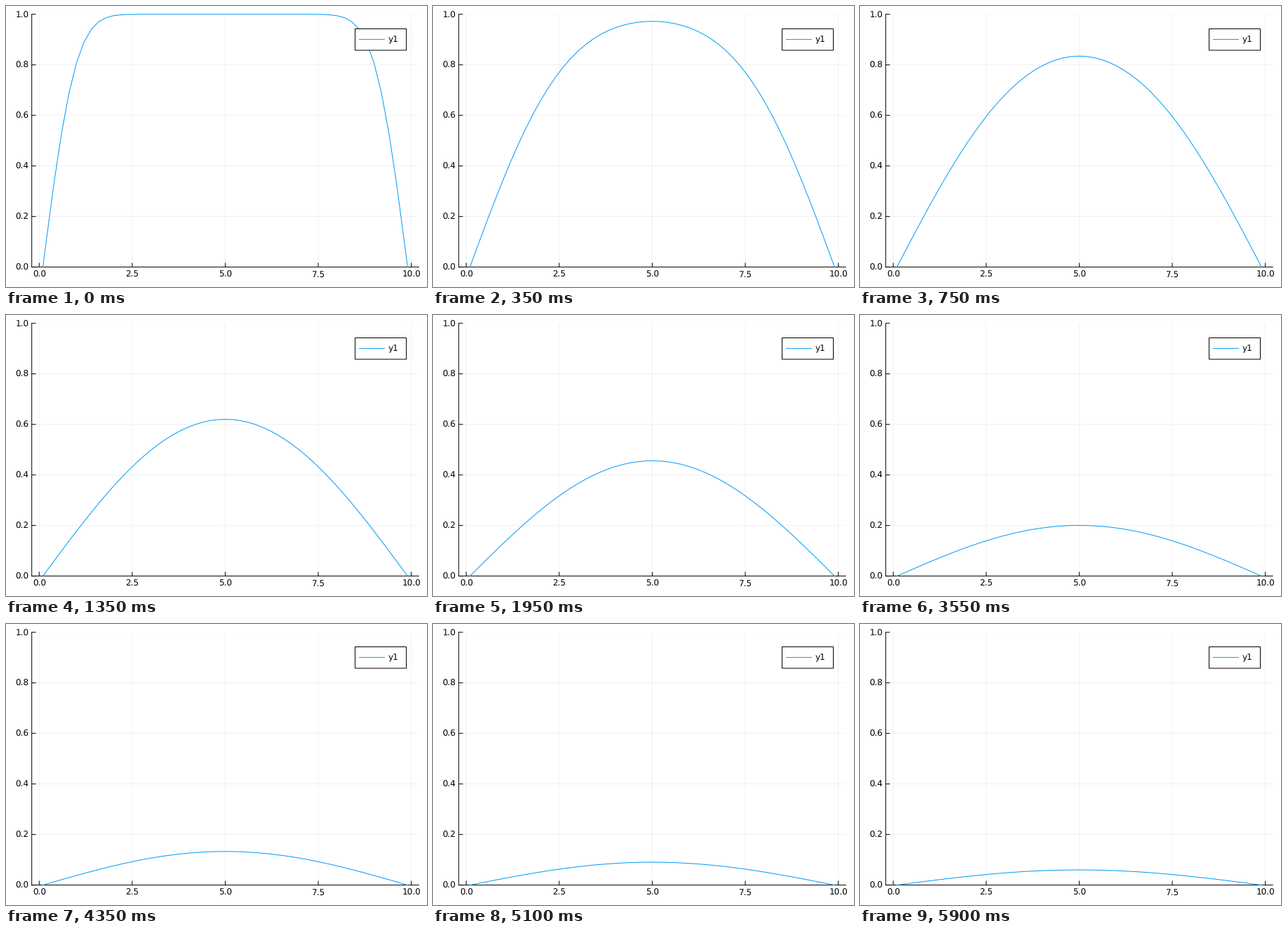
Write a matplotlib script that moves like this. It is 600x400 px and loops after 5.95 s.

```python
import numpy as np
import matplotlib.pyplot as plt
from matplotlib.animation import FuncAnimation
from matplotlib.lines import Line2D
from matplotlib.patches import Rectangle
from matplotlib.transforms import Affine2D

W, H, DPI = 600, 400, 100
PX = 72 / DPI  # points per pixel
LEFT, RIGHT, TOP, BOTTOM = 36.7, 588.2, 11.8, 371.6
BLUE = "#009AF9"
FONT = 12 * PX
TICK = 6

FRAMES, INTERVAL = 119, 50
DX, DT, STEPS = 0.2, 0.01, 25

plt.rcParams.update({
    "font.family": "DejaVu Sans",
    "path.snap": False,
    "text.hinting": "no_hinting",
})


def diffuse(u, steps):
    """Explicit heat steps with zero walls midway to mirrored ghost cells."""
    for _ in range(steps):
        g = np.concatenate(([-u[0]], u, [-u[-1]]))
        u = u + DT / DX**2 * (g[2:] - 2 * u + g[:-2])
    return u


cells = np.arange(1, 50) * DX
x = np.concatenate(([0.1], cells, [9.9]))
profiles = [diffuse(np.ones(len(cells)), STEPS - 1)]
while len(profiles) < FRAMES:
    profiles.append(diffuse(profiles[-1], STEPS))

fig = plt.figure(figsize=(W / DPI, H / DPI), dpi=DPI, facecolor="white")
ax = fig.add_axes([LEFT / W, 1 - BOTTOM / H, (RIGHT - LEFT) / W, (BOTTOM - TOP) / H])
x0, x1 = -0.2, 10.2
xticks, yticks = np.linspace(0, 10, 5), np.linspace(0, 1, 6)
ax.set(xlim=(x0, x1), ylim=(0, 1), xticks=xticks, yticks=yticks)
ax.xaxis.set_major_formatter("{x:.1f}")
ax.yaxis.set_major_formatter("{x:.1f}")
ax.tick_params(length=0, labelsize=FONT)
ax.tick_params(axis="x", pad=4.8 * PX)
ax.tick_params(axis="y", pad=4 * PX)
ax.grid(color="black", alpha=0.06, linewidth=PX)
ax.set_axisbelow(True)
ax.spines[["top", "right"]].set_visible(False)
ax.spines[["left", "bottom"]].set_linewidth(PX)

# Inward ticks as plain lines, so they keep subpixel positions
tick_style = dict(color="black", lw=PX, clip_on=False)
ax.vlines(xticks, 0, TICK / (BOTTOM - TOP), **tick_style)
ax.hlines(yticks, x0, x0 + TICK * (x1 - x0) / (RIGHT - LEFT), **tick_style)

curve, = ax.plot([], [], color=BLUE, lw=PX, clip_on=False, zorder=3)
ax.set(xlim=(x0, x1), ylim=(0, 1))

# Legend, placed in pixels from the top left corner
pixels = Affine2D().scale(1, -1).translate(0, H)
ax.add_artist(Rectangle((497.5, 32.5), 73, 30.5, fc="white", ec="black", lw=PX,
                        transform=pixels, zorder=5))
ax.add_artist(Line2D([503.5, 539.5], [47.6, 47.6], color=BLUE, lw=PX,
                     transform=pixels, zorder=6))
ax.text(545, 52, "y1", fontsize=FONT, transform=pixels, zorder=6)


def update(i):
    curve.set_data(x, np.concatenate(([0], profiles[i], [0])))
    return curve,


anim = FuncAnimation(fig, update, frames=FRAMES, interval=INTERVAL,
                     repeat=True, repeat_delay=0)
plt.show()
```
